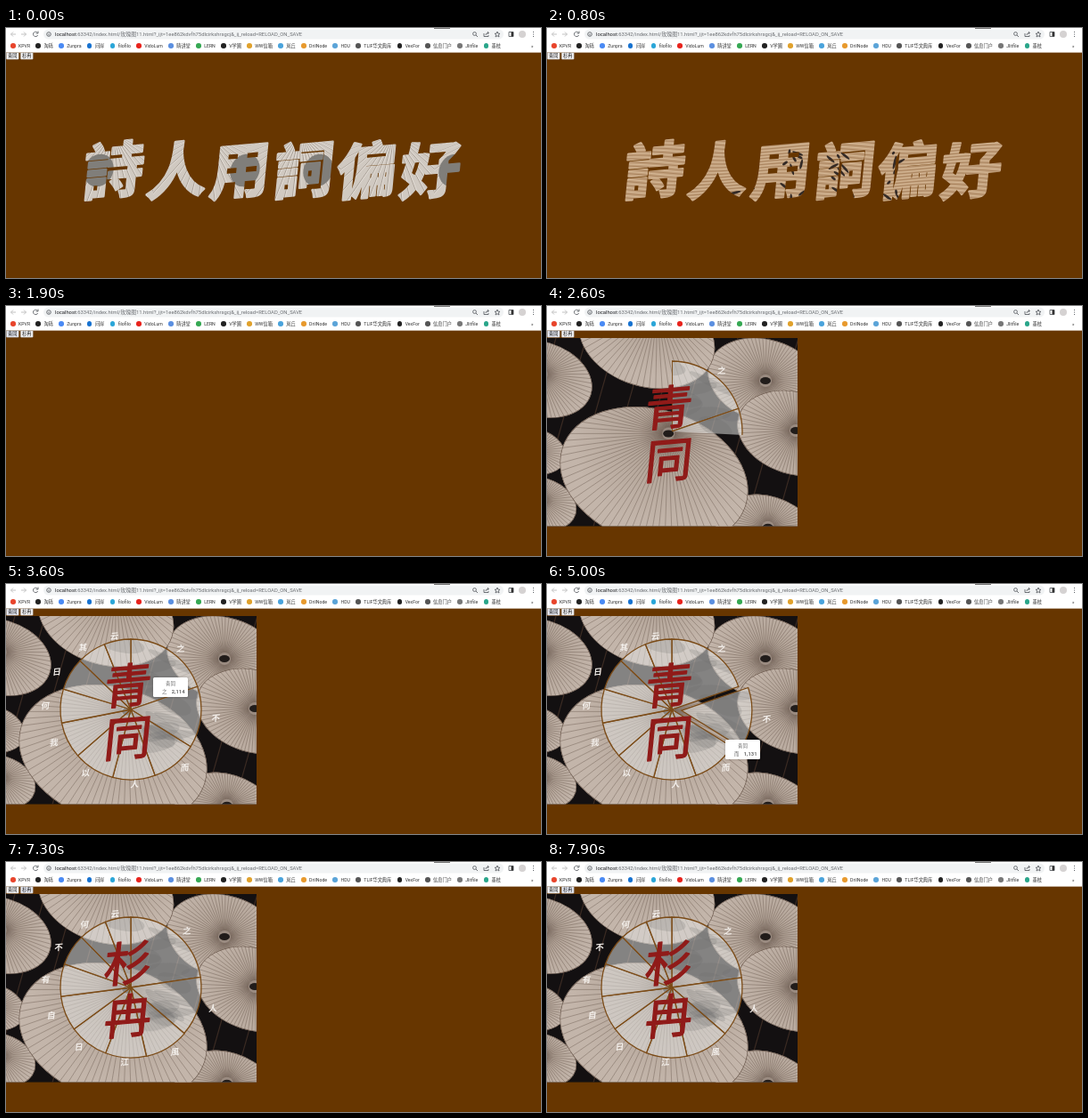
Write an HTML page with a canvas that moves like this. It is 600 by 281 pixels and loops after 8 s.

```html
<!DOCTYPE html>
<html lang="en">
<head>
<meta charset="utf-8">
<title>Rose chart</title>
<style>
  html, body { margin: 0; width: 100%; height: 100%; overflow: hidden; background: #673600; }
  canvas, svg { position: absolute; left: 0; top: 0; width: 600px; height: 281px; }
  text, #marks { font-family: Roboto, "Noto Sans CJK SC", sans-serif; font-size: 5.2px; fill: #333; color: #333; }
  .url { font-size: 5.84px; fill: #6a6d71; }
  .url tspan { fill: #202124; }
  .icon { fill: none; stroke: #5f6368; stroke-width: .9; }
  .faint { stroke: #bbb; }
  #marks { position: absolute; left: 5px; top: 16px; width: 550px; height: 8px; line-height: 8px;
    display: flex; justify-content: space-between; white-space: nowrap; }
  #marks span { display: flex; align-items: center; gap: 3.5px; }
  #marks i { width: 5.6px; height: 5.6px; border-radius: 50%; }
</style>
</head>
<body>
<canvas id="stage"></canvas>
<svg viewBox="0 0 600 281">
  <rect width="600" height="27.600" fill="#fff"/>
  <rect x="480" width="18" height="1" fill="#777"/>
  <rect x="42" y="1.500" width="516" height="11" rx="5.500" fill="#f1f3f4"/>
  <path class="icon faint" d="M11 7H5.500M8 4.500L5.500 7L8 9.500M17 7H22.500M20 4.500L22.500 7L20 9.500"/>
  <path class="icon" d="M35.500 5.500A2.700 2.700 0 1 0 35.700 8M36 3.500V6H33.500"/>
  <circle class="icon" cx="48" cy="7" r="2.300"/>
  <path class="icon" d="M48 6.500V8.300"/>
  <text class="url" x="55" y="9.200"><tspan>localhost</tspan>:63342/index.html/玫瑰图11.html?_ijt=1ee862kdvfh75dlcirkshrsgcj&amp;_ij_reload=RELOAD_ON_SAVE</text>
  <circle class="icon" cx="525.500" cy="6.500" r="1.900"/>
  <path class="icon" d="M527 8L529 10M536 6V9.500H541V8M538 8Q538 5.500 541 5.500M540 4L541.500 5.500L540 7"/>
  <path class="icon" d="M551 4L551.900 6.200L554 6.300L552.400 7.700L553 10L551 8.700L549 10L549.600 7.700L548 6.300L550.100 6.200Z"/>
  <path class="icon" d="M564 4.500H569V9.500H564Z"/>
  <rect x="566.500" y="4.500" width="2.500" height="5" fill="#333"/>
  <circle cx="579" cy="7" r="4" fill="#d5d2d2"/>
  <path d="M591 4h1v1h-1zM591 6.500h1v1h-1zM591 9h1v1h-1z" fill="#5f6368"/>
  <text x="589" y="21.500">»</text>
  <g id="buttons"></g>
</svg>
<div id="marks"></div>
<script>
const W = 600, H = 281, LOOP = 8000, TAU = Math.PI * 2;
const CX = 140, CY = 141, R = 79;
const FONT = '"Noto Sans CJK SC", "Noto Sans CJK", sans-serif';
const POETS = ["青同", "杉冉"];
const PAGE = 1900, CHART = 2200, PICK_A = 4250, PICK_B = 5650, NEXT = 6900;

const $ = id => document.getElementById(id);
const scale = Math.max(1, window.devicePixelRatio || 1);
const clamp = v => Math.min(1, Math.max(0, v));
const ramp = (t, start, length) => clamp((t - start) / length);
const ease = p => p < .5 ? 4 * p ** 3 : 1 - (2 - 2 * p) ** 3 / 2;
const mix = (a, b, p) => a + (b - a) * p;

// Browser bar
const MARKS = {
  KPVR: "#e8452c", 淘砾: "#222", Zunpra: "#4a8af4", 问岸: "#1772d0", filofilo: "#2ba6d8", VidoLum: "#e8231c",
  晴讲堂: "#5b8fe0", LERN: "#35a853", V学圃: "#222", WW信箱: "#e0a12c", 岚丘: "#4aa3dc", DrilNode: "#e89a2e",
  HDU: "#5ba4d8", TLIF华文典库: "#555", VexFor: "#222", 信息门户: "#555", Jlitfile: "#777", 墨枝: "#2aa68a"
};
$("marks").innerHTML = Object.entries(MARKS).map(([name, color]) =>
  `<span><i style="background:${color}"></i>${name}</span>`).join("");
$("buttons").innerHTML = POETS.map((name, i) =>
  `<rect x="${i * 16 + .3}" y="27.800" width="14" height="7.400" rx=".8" stroke="#888" stroke-width=".3"/>
   <text x="${i * 16 + 7.300}" y="33.400" text-anchor="middle" style="fill:#111">${name}</text>`).join("");
const buttons = $("buttons").querySelectorAll("rect");

// Drawing surfaces
function surface(canvas, paint) {
  canvas.width = W * scale;
  canvas.height = H * scale;
  const g = canvas.getContext("2d");
  g.scale(scale, scale);
  if (paint) paint(g);
  return canvas;
}
const layer = paint => surface(document.createElement("canvas"), paint);
const blit = (g, image) => g.drawImage(image, 0, 0, W, H);

function random(seed) {
  return () => (seed = seed * 16807 % 2147483647) / 2147483647;
}

function oval(g, x, y, rx, ry, color, turn = 0) {
  g.fillStyle = color;
  g.beginPath();
  g.ellipse(x, y, rx, ry, turn, 0, TAU);
  g.fill();
}

function rays(g, x, y, length, count, color, width) {
  g.strokeStyle = color;
  g.lineWidth = width;
  g.beginPath();
  for (let i = 0; i < count; i++) {
    const a = i / count * TAU, dx = Math.cos(a), dy = Math.sin(a);
    g.moveTo(x + dx * 7, y + dy * 7);
    g.lineTo(x + dx * length, y + dy * length);
  }
  g.stroke();
}

function slanted(g, char, x, y, size, weight, edge) {
  g.save();
  g.translate(x, y);
  g.transform(1, -.09, -.1, 1, 0, 0);
  g.font = `${weight} ${size}px ${FONT}`;
  g.textAlign = "center";
  g.lineJoin = "round";
  g.lineWidth = edge;
  g.fillText(char, 0, size * .37);
  if (edge) g.strokeText(char, 0, size * .37);
  g.restore();
}

// Heading
const titleMask = layer(g => {
  [..."詩人用詞偏好"].forEach((char, i) => slanted(g, char, 121 + 71 * i, 160, 68, 900, 2.6));
});

const paperTexture = layer(g => {
  g.fillStyle = "#d0c9c1";
  g.fillRect(0, 0, W, H);
  for (let x = 60; x < 560; x += 105) {
    g.save();
    g.beginPath();
    g.rect(x, 110, 105, 100);
    g.clip();
    rays(g, x + 60, 118, 140, 52, "#998e84", .7);
    rays(g, x + 61, 118, 140, 52, "#ebe6e0", .7);
    g.restore();
  }
  for (const x of [104, 268, 350, 502]) oval(g, x, 160, 16, 19, "#807e7a", .5);
});

const woodTexture = layer(g => {
  const rnd = random(37);
  g.fillStyle = "#c2a07c";
  g.fillRect(0, 0, W, H);
  g.lineWidth = .7;
  for (let y = 110; y < 210; y += 2) {
    g.strokeStyle = y % 4 ? "#a37c57" : "#dcc1a0";
    g.beginPath();
    for (let x = 80; x < 530; x += 6) g.lineTo(x, y + 3 * Math.sin(x / 31 + y / 19));
    g.stroke();
  }
  for (let i = 0; i < 40; i++) {
    const x = 210 + i % 4 * 54 + rnd() * 24;
    oval(g, x, 135 + rnd() * 58, 2 + rnd() * 6, 1.4, "#332a26", rnd() * 3);
  }
});

const titleLayer = layer();
const titleInk = titleLayer.getContext("2d");
function drawTitle(g, t) {
  const wood = ramp(t, 0, 800) * (1 - ramp(t, 1000, 800));
  titleInk.globalCompositeOperation = "source-over";
  blit(titleInk, paperTexture);
  titleInk.globalAlpha = wood;
  blit(titleInk, woodTexture);
  titleInk.globalAlpha = 1;
  titleInk.globalCompositeOperation = "destination-in";
  blit(titleInk, titleMask);
  blit(g, titleLayer);
}

// Parasols behind the chart; lean moves the hub towards the far rim
function parasol(g, x, y, r, lean) {
  const hubX = x + .15 * r * lean, hubY = y - .45 * r * lean;
  const rim = new Path2D();
  rim.ellipse(x, y, r, r * .7, .3, 0, TAU);
  g.save();
  const shade = g.createRadialGradient(hubX, hubY, 2, hubX, hubY, r);
  shade.addColorStop(0, "#94857b");
  shade.addColorStop(.3, "#b3a498");
  shade.addColorStop(1, "#c3b5aa");
  g.fillStyle = shade;
  g.fill(rim);
  g.clip(rim);
  rays(g, hubX, hubY, 2 * r, Math.round(40 + r / 2), "rgba(88,70,60,.6)", .6);
  g.strokeStyle = "#6b594d";
  g.lineWidth = 1.4;
  g.stroke(rim);
  g.restore();
  oval(g, hubX, hubY, 6, 4, "#211c1a");
}

const backdrop = layer(g => {
  g.beginPath();
  g.rect(0, 36, 281, 211.5);
  g.clip();
  g.fillStyle = "#131011";
  g.fillRect(0, 36, 281, 212);
  g.strokeStyle = "#3a2a22";
  g.lineWidth = 1.2;
  g.beginPath();
  for (let x = 10; x < 340; x += 34) {
    g.moveTo(x, 36);
    g.lineTo(x - 60, 248);
  }
  g.stroke();
  const spots = [[245, 84, 66, 0], [278, 143, 66, .1], [112, 36, 78, 1], [-8, 82, 60, .2],
    [-14, 163, 36, 0], [-8, 222, 42, .2], [246, 254, 58, .2], [120, 192, 108, 1]];
  for (const spot of spots) parasol(g, ...spot);
});

// Chart
const COUNTS = [2114, 1518, 1131, 1042, 1012, 893, 834, 804, 719, 655];
const LABELS = ["之不而人以我何日其云", "之人風江日自有不何云"];
const LETTERING = ["青同", "至仙", "杉冉"];

function angles(counts) {
  const total = counts.reduce((a, b) => a + b);
  return counts.map(c => c / total * TAU);
}
const spans = [angles(COUNTS), angles(COUNTS.map((c, i) => i ? c : c * 1.2))];

// Pale wash with drifting hills
const mist = layer(g => {
  const rnd = random(91);
  g.fillStyle = "rgba(222,221,220,.56)";
  g.fillRect(CX - R, CY - R, 2 * R, 2 * R);
  for (let i = 0; i < 16; i++) {
    const a = -1.7 + rnd() * 2.6, d = 25 + rnd() * 50;
    oval(g, CX + Math.cos(a) * d, CY + Math.sin(a) * d, 10 + rnd() * 20, 4 + rnd() * 7,
      "rgba(105,105,108,.2)", rnd() - .3);
  }
});

function drawSlice(g, from, to, shift) {
  const mid = (from + to) / 2, shape = new Path2D();
  shape.moveTo(CX, CY);
  shape.arc(CX, CY, R, from, to);
  shape.closePath();
  g.save();
  g.translate(Math.cos(mid) * shift, Math.sin(mid) * shift);
  g.save();
  g.clip(shape);
  blit(g, mist);
  g.restore();
  g.strokeStyle = "#7b4b17";
  g.lineWidth = 1.3;
  g.stroke(shape);
  g.restore();
}

function drawChart(g, t) {
  blit(g, backdrop);
  const sweep = ease(ramp(t, CHART, 1000)), change = ease(ramp(t, NEXT, 500));
  const second = 11 * ease(ramp(t, PICK_A, 300)) * (1 - ease(ramp(t, PICK_B, 300)));
  const third = 11 * ease(ramp(t, PICK_B, 300)) * (1 - change);
  const chars = LABELS[t < NEXT ? 0 : 1];
  const top = -TAU / 4;
  g.save();
  if (sweep < 1) {
    g.beginPath();
    g.moveTo(CX, CY);
    g.arc(CX, CY, 130, top, top + TAU * sweep);
    g.clip();
  }
  let from = top;
  COUNTS.forEach((_, i) => {
    const to = from + mix(spans[0][i], spans[1][i], change), mid = (from + to) / 2;
    const shift = i === 1 ? second : i === 2 ? third : 0;
    drawSlice(g, from, to, shift);
    g.fillStyle = "#f3efeb";
    slanted(g, chars[i], CX + Math.cos(mid) * (96 + shift), CY + Math.sin(mid) * (84 + shift), 9.5, 700, 0);
    from = to;
  });
  g.restore();
  g.fillStyle = g.strokeStyle = "#901b19";
  const word = LETTERING[t < PICK_B ? 0 : t < NEXT ? 1 : 2];
  [...word].forEach((char, i) => slanted(g, char, 137, 114 + 59 * i, 53, 400, 1.4));
}

// Tooltip stops: time, x, y
const STOPS = [[3300, 158, 88], [3600, 165, 105], [5000, 200, 175], [5600, 200, 175], [6500, 111, 79], [6800, 105, 72]];

function sliceAt(x, y) {
  let rest = (Math.atan2(x - CX, CY - y) + TAU) % TAU;
  return spans[0].findIndex(span => (rest -= span) < 0);
}

function drawTip(g, t) {
  const i = STOPS.findIndex(stop => t < stop[0]) - 1;
  if (i < 0) return;
  const [start, x0, y0] = STOPS[i], [end, x1, y1] = STOPS[i + 1];
  const p = ease(ramp(t, start, end - start));
  const x = mix(x0, x1, p), y = mix(y0, y1, p);
  const slice = sliceAt(x - 5, y + 5), value = COUNTS[slice].toLocaleString("en-US");
  const w = value.length > 3 ? 39 : 35;
  g.save();
  g.translate(x, y);
  g.shadowColor = "rgba(0,0,0,.25)";
  g.shadowBlur = 3 * scale;
  g.fillStyle = "#fff";
  g.beginPath();
  g.roundRect(0, 0, w, 22, 1.5);
  g.fill();
  g.shadowColor = "transparent";
  g.fillStyle = "#666";
  g.font = `5.4px ${FONT}`;
  g.textAlign = "center";
  g.fillText(POETS[0], w / 2, 9);
  g.textAlign = "left";
  g.fillText(LABELS[0][slice], 10, 17.6);
  g.font = "bold 5.8px Roboto, sans-serif";
  g.textAlign = "right";
  g.fillText(value, w - 3.5, 17.6);
  g.restore();
}

const ink = surface($("stage")).getContext("2d");
function draw(now) {
  const t = now % LOOP;
  ink.fillStyle = "#673600";
  ink.fillRect(0, 0, W, H);
  if (t < PAGE) drawTitle(ink, t);
  if (t >= CHART) {
    drawChart(ink, t);
    drawTip(ink, t);
  }
  const active = t < 1700 ? -1 : t < NEXT ? 0 : 1;
  buttons.forEach((b, i) => b.setAttribute("fill", i === active ? "#e3e6f0" : "#f2f2f4"));
}

const begin = performance.now();
function tick() {
  draw(performance.now() - begin);
  requestAnimationFrame(tick);
}
tick();
</script>
</body>
</html>
```
